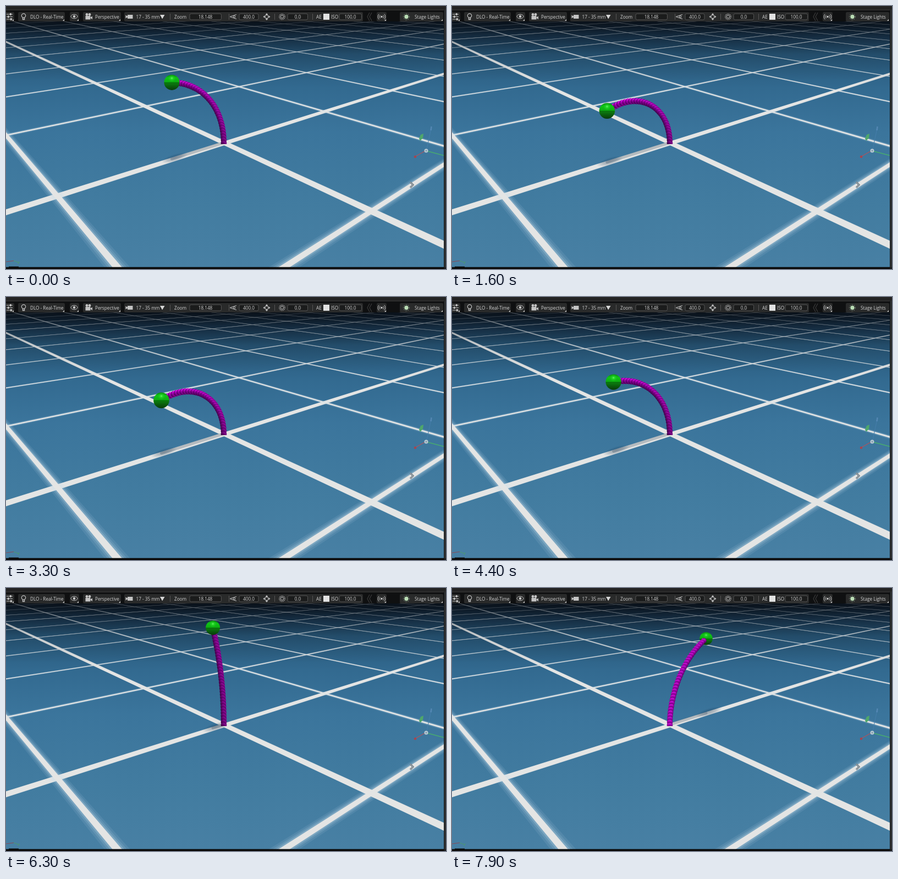
These frames come from a looping animation (800 px wide and 478 px high, 8 s). An HTML page with a canvas:

```html
<!DOCTYPE html>
<html lang="en">
<head>
<meta charset="utf-8">
<title>Bending arm</title>
<style>
html, body { margin: 0; width: 100%; height: 100%; overflow: hidden; background: #000; }
canvas { display: block; width: 100vw; height: 100vh; }
</style>
</head>
<body>
<canvas id="stage" width="800" height="478"></canvas>
<script>
const W = 800, H = 478, LOOP = 8000, STEP = 100;
const HELD = [3, 17, 19, 39, 45, 77]; // steps that repeat the pose before
const LENGTH = 181.5, SQUASH = 0.79, BEADS = 31;

// time (s), bend angle (rad, positive to the left), rate of change
const BEND = [
  [0, 1.413, 0.52], [1.6, 1.981, 0.19], [3.3, 1.952, -0.21], [4.4, 1.591, -0.44],
  [5.1, 1.226, -0.63], [6.3, 0.273, -0.83], [7.9, -1.1, -0.85]
];

const stage = document.getElementById('stage').getContext('2d');

// ground plane to screen; the arm stands at 0,0
const depth = (i, j) => 1 - 0.2966 * i + 0.2522 * j;
function ground(i, j) {
  const w = depth(i, j);
  return [(397.5 + 69.7 * i + 327.9 * j) / w, (249.2 + 13 * i - 9.08 * j) / w];
}

function trace(c, points) {
  c.beginPath();
  points.forEach(([x, y], n) => n ? c.lineTo(x, y) : c.moveTo(x, y));
}

function line(c, color, width, ...points) {
  c.strokeStyle = color;
  c.lineWidth = width;
  trace(c, points);
  c.stroke();
}

function poly(c, color, ...points) {
  c.fillStyle = color;
  trace(c, points);
  c.fill();
}

function disc(c, color, x, y, r) {
  c.fillStyle = color;
  c.beginPath();
  c.arc(x, y, r, 0, 7);
  c.fill();
}

function ring(c, color, x, y, r, width = 1, from = 0, to = 7) {
  c.strokeStyle = color;
  c.lineWidth = width;
  c.beginPath();
  c.arc(x, y, r, from, to);
  c.stroke();
}

function pill(c, color, x0, x1, y = 11, h = 17, border) {
  c.beginPath();
  c.roundRect(x0, y, x1 - x0, h, 2.5);
  c.fillStyle = color;
  c.fill();
  if (border) {
    c.strokeStyle = border;
    c.lineWidth = 1;
    c.stroke();
  }
}

function fade(g, stops) {
  stops.forEach(([at, color]) => g.addColorStop(at, color));
  return g;
}

// a floor line; the two axes are wide and crisp, the others thin with a soft rim
function drawStrip(c, strip, isAxis) {
  if (!isAxis) {
    poly(c, 'rgba(190,215,230,.1)', ...strip(0.034));
    poly(c, 'rgba(190,215,230,.14)', ...strip(0.026));
    poly(c, 'rgba(200,220,232,.24)', ...strip(0.019));
  }
  const core = strip(isAxis ? 0.025 : 0.0125);
  poly(c, '#e4e5e4', ...core);
  line(c, 'rgba(228,229,228,.3)', 0.8, ...core);
}

function drawFloor(c) {
  c.fillStyle = fade(c.createLinearGradient(0, 28, 0, H), [
    [0, '#0c1722'], [0.06, '#1a364e'], [0.13, '#265271'], [0.24, '#31688e'],
    [0.45, '#3b759c'], [0.75, '#427ca0'], [1, '#4880a4']
  ]);
  c.fillRect(0, 0, W, H);

  for (let i = -24; i <= 1; i++) {
    const near = (0.12 - depth(i, 0)) / 0.2522;
    drawStrip(c, e => [ground(i - e, near), ground(i + e, near + 0.1),
                       ground(i + e, near + 500), ground(i - e, near + 500)], i === 0);
  }
  for (let j = -1; j <= 20; j++) {
    const near = (depth(0, j) - 0.12) / 0.2966;
    drawStrip(c, e => [ground(near, j - e), ground(near - 0.1, j + e),
                       ground(near - 500, j + e), ground(near - 500, j - e)], j === 0);
  }

  c.fillStyle = fade(c.createLinearGradient(0, 28, 0, 150), [
    [0, 'rgba(8,14,22,.65)'], [0.2, 'rgba(10,22,34,.36)'],
    [0.5, 'rgba(14,34,52,.12)'], [1, 'rgba(14,34,52,0)']
  ]);
  c.fillRect(0, 28, W, 122);
}

function drawGizmos(c) {
  line(c, 'rgba(70,125,170,.9)', 1.2, [765, 260], [773, 222]);
  line(c, 'rgba(90,140,185,.8)', 2.5, [772.5, 226], [773.5, 219]);
  line(c, '#48ab70', 1.3, [767, 264], [797, 272]);
  line(c, '#ab5560', 1.3, [761, 264], [745, 273]);
  disc(c, '#a54650', 744, 274, 2.3);
  poly(c, '#4fa76b', [751, 241], [754, 234], [759, 232], [758, 240], [753, 245]);
  disc(c, '#b9cad4', 764, 263, 3.5);
  disc(c, '#7d98aa', 764, 263, 1.5);
  line(c, '#5c6870', 3, [735, 320], [740, 325], [735, 330]);
  line(c, '#aab2b6', 1.2, [735, 320], [740, 325], [735, 330]);
  line(c, '#8a4a55', 1, [0, 465], [14, 463]);
  line(c, '#4c9a6c', 1, [14, 463], [22, 466], [25, 465]);
  line(c, '#4c9a6c', 1, [22, 466], [23, 469]);
}

function drawIcons(c) {
  const ink = '#c4c4c4';
  // sliders
  [[15, 8], [19.5, 4], [24, 9]].forEach(([y, x]) => {
    line(c, ink, 1, [1, y], [12, y]);
    c.fillStyle = ink;
    c.fillRect(x - 1, y - 2, 2.5, 4);
  });
  // lamp
  ring(c, ink, 32, 17.5, 3.7, 1.2);
  line(c, ink, 1.4, [30.5, 21], [30.5, 24.5], [33.5, 24.5], [33.5, 21]);
  // eye
  c.strokeStyle = ink;
  c.lineWidth = 1;
  c.beginPath();
  c.ellipse(124, 19, 6, 3.8, 0, 0, 7);
  c.stroke();
  disc(c, ink, 124, 19, 2.3);
  // cameras
  disc(c, ink, 147, 15.5, 2.4);
  disc(c, ink, 152, 15.5, 2.4);
  c.fillStyle = ink;
  c.fillRect(144.5, 18, 9, 6.5);
  poly(c, ink, [153, 21], [157, 18.5], [157, 24.5]);
  c.fillRect(221, 16, 9.5, 7);
  poly(c, ink, [222, 19.5], [217.5, 16.5], [217.5, 22.5]);
  poly(c, '#d6d6d6', [280, 16], [288.5, 16], [284.2, 23.5]);
  // field of view
  line(c, ink, 1, [419, 15.5], [407, 19.5], [419, 23.5]);
  ring(c, ink, 415, 19.5, 1.8);
  // focus
  ring(c, ink, 474, 19.5, 3, 1);
  for (let n = 0; n < 4; n++) {
    const a = n * Math.PI / 2, x = Math.cos(a), y = Math.sin(a);
    poly(c, ink, [474 + 6.5 * x, 19.5 + 6.5 * y],
      [474 + 3.5 * x - 2.5 * y, 19.5 + 3.5 * y + 2.5 * x],
      [474 + 3.5 * x + 2.5 * y, 19.5 + 3.5 * y - 2.5 * x]);
  }
  // aperture
  c.setLineDash([1.6, 1]);
  ring(c, '#999', 502, 19.5, 5, 1.6);
  c.setLineDash([]);
  ring(c, ink, 502, 19.5, 2.8, 1);
  // signal
  disc(c, ink, 683, 19.5, 1.8);
  for (const r of [4, 6.8]) {
    ring(c, ink, 683, 19.5, r, 1, -0.8, 0.8);
    ring(c, ink, 683, 19.5, r, 1, Math.PI - 0.8, Math.PI + 0.8);
  }
  // stage light
  c.setLineDash([2, 2]);
  ring(c, '#8aa08a', 728, 19.5, 5.5, 1);
  c.setLineDash([]);
  disc(c, '#b9dcb4', 728, 19.5, 3.7);
}

function drawToolbar(c) {
  c.fillStyle = '#0f1011';
  c.fillRect(0, 0, W, 28);
  c.fillStyle = '#232323';
  c.fillRect(0, 0, W, 8);
  c.fillStyle = '#333';
  c.fillRect(0, 6.5, W, 1.5);

  [[-4, 15], [22, 107], [116, 133], [140, 209], [215, 649], [674, 692], [716, 795]]
    .forEach(([a, b]) => pill(c, '#292a2a', a, b));
  [[334, 391.5], [424, 459], [512, 548.5], [606, 646.5]]
    .forEach(([a, b]) => pill(c, '#1b1c1c', a, b, 14, 11, '#555'));
  [298.5, 405.5, 488.5, 557.5].forEach(x => line(c, '#555', 1, [x, 14], [x, 25]));
  [14, 106, 132, 208, 691, 794].forEach(x => poly(c, '#ccc', [x, 24], [x, 27], [x - 3, 27]));
  [657, 661].forEach(x => line(c, '#3a3a3a', 1.2, [x + 4, 12], [x, 19.5], [x + 4, 27]));
  c.fillStyle = '#e2e2e2';
  c.fillRect(577, 14, 11, 11);

  c.font = '8.2px "Open Sans", "Noto Sans", sans-serif';
  c.textBaseline = 'alphabetic';
  c.fillStyle = '#d2d2d2';
  c.textAlign = 'left';
  [['DLO - Real-Time', 44], ['Perspective', 162], ['17 - 35 mm', 236.5], ['Zoom', 306],
   ['AE', 564], ['ISO', 591], ['Stage Lights', 743]].forEach(([s, x]) => c.fillText(s, x, 22.6));
  c.textAlign = 'center';
  [['18.148', 362.5], ['400.0', 441.5], ['0.0', 530.5], ['100.0', 626]]
    .forEach(([s, x]) => c.fillText(s, x, 22.6));
  drawIcons(c);
}

function drawFrame(c) {
  c.fillStyle = '#0a0a0a';
  c.fillRect(0, 474.5, W, 4);
  c.fillRect(5, 473.5, 18, 5);
  c.fillStyle = '#17191b';
  c.fillRect(796, 7, 4, H);
  c.fillStyle = '#3d3f40';
  c.fillRect(797.5, 7, 1.5, H - 10);
}

function makeBackdrop() {
  const sheet = document.createElement('canvas');
  sheet.width = W;
  sheet.height = H;
  const c = sheet.getContext('2d');
  drawFloor(c);
  drawGizmos(c);
  drawToolbar(c);
  drawFrame(c);
  return sheet;
}

function bendAt(t) {
  let n = BEND.findIndex(k => k[0] > t) - 1;
  if (n < 0) n = BEND.length - 2;
  const [t0, p0, m0] = BEND[n], [t1, p1, m1] = BEND[n + 1];
  const h = t1 - t0, s = (t - t0) / h, r = 1 - s;
  return p0 * (1 + 2 * s) * r * r + m0 * h * s * r * r
       + p1 * s * s * (3 - 2 * s) - m1 * h * s * s * r;
}

// point on a circular arc that bends in the plane of one floor line
function armPoint(bend, f) {
  const q = Math.abs(bend) < 1e-3 ? 1e-3 : bend, phi = q * f;
  const j = -SQUASH * LENGTH * (1 - Math.cos(phi)) / q / 227.6;
  const w = depth(0, j), [x, y] = ground(0, j);
  return { x: x - 1.5, y: y - LENGTH * Math.sin(phi) / q / w, w, phi, foot: [x - 1.5, y] };
}

function drawShadow(c, tip) {
  const [fx, fy] = tip.foot;
  c.save();
  c.lineCap = 'round';
  line(c, 'rgba(60,80,95,.28)', 5, [394, 249], [fx, fy - 1]);
  c.translate(fx + 5, fy - 3);
  c.rotate(-0.3);
  c.scale(1, 0.28);
  disc(c, fade(c.createRadialGradient(0, 0, 2, 0, 0, 25), [
    [0, 'rgba(22,52,80,.34)'], [0.5, 'rgba(25,58,88,.24)'], [1, 'rgba(30,70,100,0)']
  ]), 0, 0, 25);
  c.restore();
}

function drawArm(c, bend) {
  const tone = (r, g, b, k) => `rgb(${r * k},${g * k},${b * k})`;
  c.save();
  c.beginPath();
  c.rect(0, 0, W, 251);
  c.clip();
  for (let n = BEADS; n >= 0; n--) {
    const p = armPoint(bend, n / BEADS * 0.96), r = 5.3 / p.w;
    const left = bend >= 0;
    const k = left ? Math.min(1.1, 0.64 + 0.3 * p.phi) : 0.96;
    // light comes from above, and from the right while the arm leans left
    const lx = left ? r * 0.6 : 0, ly = left ? r * 0.8 : r;
    disc(c, fade(c.createLinearGradient(p.x + lx, p.y - ly, p.x - lx, p.y + ly), [
      [0, tone(180, 5, 190, k)], [0.25, tone(205, 12, 217, k)],
      [0.55, tone(145, 0, 157, k)], [1, tone(66, 0, 78, k)]
    ]), p.x, p.y, r);
    // joint between two beads
    c.save();
    c.translate(p.x, p.y);
    c.rotate(-p.phi);
    ring(c, 'rgba(60,0,75,.55)', 0, 0, r - 0.4, 0.9, Math.PI + 0.2, 2 * Math.PI - 0.2);
    c.restore();
  }
  c.restore();
}

function drawBall(c, { x, y, w }) {
  const r = 12.7 / w;
  disc(c, fade(c.createLinearGradient(0, y - r, 0, y + r), [
    [0, '#078a0b'], [0.2, '#0fc416'], [0.48, '#0dac12'], [0.54, '#0b7d0e'], [0.8, '#0a560c'], [1, '#083d0a']
  ]), x, y, r);
  disc(c, fade(c.createRadialGradient(x, y - r * 0.55, 0, x, y - r * 0.55, r * 0.5), [
    [0, 'rgba(130,255,125,.85)'], [0.35, 'rgba(60,240,60,.45)'], [1, 'rgba(30,220,35,0)']
  ]), x, y - r * 0.5, r * 0.5);
  c.setLineDash([1, 1]);
  line(c, 'rgba(5,50,8,.75)', 1.2, [x - r + 0.5, y + 0.5], [x + r - 0.5, y + 0.5]);
  c.setLineDash([]);
}

const backdrop = makeBackdrop();
const start = performance.now();

function draw(now) {
  let step = Math.floor(Math.max(0, now - start) % LOOP / STEP);
  if (HELD.includes(step)) step--;
  const bend = bendAt(step * STEP / 1000), tip = armPoint(bend, 1);
  stage.drawImage(backdrop, 0, 0);
  drawShadow(stage, tip);
  if (bend < 0) drawBall(stage, tip);
  drawArm(stage, bend);
  if (bend >= 0) drawBall(stage, tip);
  requestAnimationFrame(draw);
}
requestAnimationFrame(draw);
</script>
</body>
</html>
```
